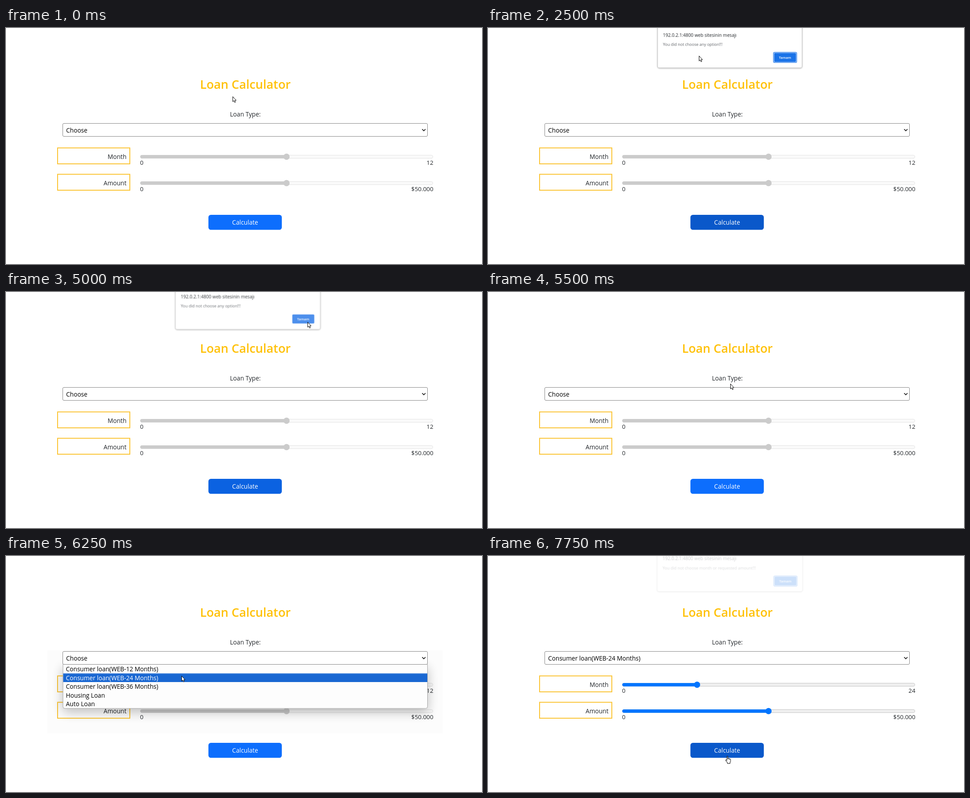
Recreate the animation shown at these times as an HTML page. Size 1061x528 px, loop 8000 ms.

```html
<!DOCTYPE html>
<html lang="en">
<head>
<meta charset="utf-8">
<title>Loan Calculator</title>
<style>
html, body { margin: 0; width: 100%; height: 100%; overflow: hidden; background: #fff; }
svg { display: block; width: 100%; height: 100%; }
text { font: 13.6px "Open Sans", "Noto Sans", sans-serif; fill: #212529; }
.mid { text-anchor: middle; }
.end { text-anchor: end; }
.black text { fill: #000; }
.title { font-size: 26.8px; font-weight: 600; fill: #ffc107; }
.num { font-size: 13.3px; }
.label { fill: none; stroke: #fbc433; stroke-width: 2; }
.track { fill: var(--track); stroke: var(--edge); }
.fill { stroke: var(--fill); stroke-width: 7.4; stroke-linecap: round; }
.thumb { fill: var(--fill); }
.grey { --track: #fafafa; --edge: #e3e3e3; --fill: #cbcbcb; }
.blue { --track: #efefef; --edge: #c6c6c6; --fill: #0075ff; }
.head { font-size: 10px; }
.msg { font-size: 8.9px; fill: #5f6368; }
.ok { font-size: 7.6px; font-weight: 600; fill: #fff; }

/* Every part holds its pose between quarter-second ticks: 3.125% each */
.before, .after, .select, .button, .menu, .hover, .one, .two, .dialog,
.ring, .ok-fill, .first, .second, .cursor, .arrow, .hand {
  animation-duration: 8s;
  animation-timing-function: step-end;
  animation-iteration-count: infinite;
}
.before { animation-name: before; }
.after { animation-name: after; }
@keyframes before { 0% { opacity: 1 } 84.375%, 100% { opacity: 0 } }
@keyframes after { 0% { opacity: 0 } 84.375%, 100% { opacity: 1 } }

.select { fill: #fff; animation-name: focus; }
@keyframes focus {
  0%, 96.875%, 100% { stroke: #858585; stroke-width: 1 }
  84.375% { stroke: #101010; stroke-width: 2 }
}

.button { animation-name: press; }
@keyframes press {
  0%, 65.625%, 100% { fill: #0d6efd }
  18.75%, 93.75% { fill: #0b5ed7 }
  21.875%, 96.875% { fill: #0a58ca }
  62.5% { fill: #0b62e1 }
}

.menu { animation-name: open; }
@keyframes open { 0%, 84.375%, 100% { opacity: 0 } 71.875% { opacity: 1 } }
.list { fill: #fdfdfd; stroke: #a5a5a5; filter: drop-shadow(0 8px 13px rgba(0, 0, 0, .25)); }
.hover { fill: #1967d2; animation-name: hover; }
@keyframes hover {
  0%, 84.375%, 100% { opacity: 0; transform: none }
  75% { opacity: 1; transform: none }
  78.125% { opacity: 1; transform: translateY(19.5px) }
}
.one { animation-name: one; }
.two { animation-name: two; }
@keyframes one { 0%, 78.125%, 100% { fill: #000 } 75% { fill: #fff } }
@keyframes two { 0%, 84.375%, 100% { fill: #000 } 78.125% { fill: #fff } }

.dialog { transform-origin: 539px 0; animation-name: dialog; }
@keyframes dialog {
  0%, 65.625%, 100% { opacity: 0; transform: none }
  21.875%, 96.875% { opacity: .22; transform: translateY(-9.8px) scaleX(1.006) }
  25% { opacity: 1; transform: none }
  62.5% { opacity: .88; transform: translateY(-5.5px) scaleX(1.003) }
}
.panel { fill: #fff; stroke: #c8c8c8; filter: drop-shadow(0 1px 1.5px rgba(0, 0, 0, .3)); }
.ring { fill: #fff; stroke: #1a73e8; stroke-width: 1.3; animation-name: ring; }
@keyframes ring { 0%, 65.625%, 100% { opacity: 1 } 62.5% { opacity: 0 } }
.ok-fill { animation-name: ok; }
@keyframes ok { 0%, 65.625%, 100% { fill: #1a73e8 } 56.25% { fill: #3580ea } }
.first { animation-name: first; }
.second { animation-name: second; }
@keyframes first { 0% { opacity: 1 } 65.625%, 100% { opacity: 0 } }
@keyframes second { 0% { opacity: 0 } 65.625%, 100% { opacity: 1 } }

.cursor { animation-name: move; }
@keyframes move {
  0%, 100% { transform: translate(505px, 153px) }
  3.125% { transform: translate(470px, 129px) }
  6.25% { transform: translate(380px, 150px) }
  9.375% { transform: translate(323px, 222px) }
  12.5% { transform: translate(345px, 318px) }
  15.625% { transform: translate(430px, 392px) }
  18.75% { transform: translate(546px, 443px) }
  25% { transform: translate(548px, 380px) }
  28.125% { transform: translate(505px, 190px) }
  31.25% { transform: translate(470px, 62px) }
  34.375% { transform: translate(397px, 44px) }
  37.5% { transform: translate(430px, 42px) }
  40.625% { transform: translate(480px, 36px) }
  43.75% { transform: translate(517px, 42px) }
  50% { transform: translate(560px, 53px) }
  53.125% { transform: translate(605px, 58px) }
  56.25% { transform: translate(645px, 63px) }
  59.375% { transform: translate(672px, 67px) }
  65.625% { transform: translate(612px, 130px) }
  68.75% { transform: translate(540px, 205px) }
  71.875% { transform: translate(515px, 221px) }
  75% { transform: translate(440px, 246px) }
  78.125% { transform: translate(391px, 268px) }
  87.5% { transform: translate(425px, 335px) }
  90.625% { transform: translate(490px, 402px) }
  93.75% { transform: translate(529.5px, 447px) }
}
.cursor path { fill: #fff; stroke: #000; stroke-linejoin: round; }
.arrow { animation-name: arrow; }
.hand { animation-name: hand; }
@keyframes arrow { 0%, 25% { opacity: 1 } 18.75%, 93.75%, 100% { opacity: 0 } }
@keyframes hand { 0%, 25% { opacity: 0 } 18.75%, 93.75%, 100% { opacity: 1 } }
</style>
</head>
<body>
<svg viewBox="0 0 1061 528">
  <defs>
    <rect id="track" class="track" x="299.5" y="284.5" width="652" height="7" rx="3.5"/>
    <g id="half">
      <use href="#track"/>
      <path class="fill" d="M303 288H625"/>
      <circle class="thumb" cx="625.3" cy="288" r="6.9"/>
    </g>
  </defs>

  <text class="title mid" x="533.5" y="136">Loan Calculator</text>
  <text class="mid" x="533.5" y="198">Loan Type:</text>

  <rect class="label" x="115" y="268.3" width="161" height="35.6"/>
  <rect class="label" x="115" y="327.3" width="161" height="35.6"/>
  <text class="end" x="268.5" y="293">Month</text>
  <text class="end" x="268.5" y="352">Amount</text>

  <g class="grey before">
    <use href="#half"/>
    <use href="#half" y="59"/>
    <text class="num end" x="952.5" y="306.3">12</text>
  </g>
  <g class="blue after">
    <use href="#track"/>
    <path class="fill" d="M303 288H466"/>
    <circle class="thumb" cx="466" cy="288" r="6.9"/>
    <use href="#half" y="59"/>
    <text class="num end" x="952.5" y="306.3">24</text>
  </g>
  <text class="num" x="298.7" y="306.3">0</text>
  <text class="num" x="298.7" y="364.8">0</text>
  <text class="num end" x="952.5" y="364.8">$50.000</text>

  <rect class="button" x="451.2" y="418" width="163.6" height="33.5" rx="5.5"/>
  <text class="mid" x="533" y="440" style="fill:#fff">Calculate</text>

  <g class="menu">
    <path d="M92 211H973V397H92Z" opacity=".012"/>
    <path class="list" d="M127 242.5H939.5V337Q939.5 341 935.5 341H131Q127 341 127 337Z"/>
    <rect class="hover" x="127.5" y="243.5" width="811.5" height="19.5"/>
    <g class="black">
      <text class="one" x="133.5" y="258.3">Consumer loan(WEB-12 Months)</text>
      <text class="two" x="133.5" y="277.8">Consumer loan(WEB-24 Months)</text>
      <text x="133.5" y="297.3">Consumer loan(WEB-36 Months)</text>
      <text x="133.5" y="316.8">Housing Loan</text>
      <text x="133.5" y="336.3">Auto Loan</text>
    </g>
  </g>

  <rect class="select" x="126.5" y="213.5" width="813" height="29" rx="2.5"/>
  <path d="M927.6 226.3l3.7 3.7 3.7-3.7" fill="none" stroke="#111" stroke-width="1.6"/>
  <g class="black">
    <text class="before" x="134" y="234">Choose</text>
    <text class="after" x="134" y="234">Consumer loan(WEB-24 Months)</text>
  </g>

  <g class="dialog">
    <rect class="panel" x="378" y="-20" width="322" height="109" rx="4"/>
    <text class="head" x="390" y="19.5">192.0.2.1:4800 web sitesinin mesajı</text>
    <text class="msg first" x="390" y="39.7">You did not choose any option!!!</text>
    <text class="msg second" x="390" y="39.7">You did not choose month or requested amount!!!</text>
    <rect class="ring" x="636.3" y="54.3" width="51.8" height="23" rx="2.8"/>
    <rect class="ok-fill" x="637.8" y="55.8" width="48.8" height="20" rx="2"/>
    <text class="ok mid" x="662" y="68.6">Tamam</text>
  </g>

  <g class="cursor">
    <path class="arrow" d="M.5 .5V11.8L3 9.6 4.8 13.6 6.6 12.8 4.9 8.9H8.2Z"/>
    <path class="hand" transform="scale(1.06)" d="M2.8 9.5V1.8Q3.8 -.3 4.8 1.8V6.2Q6 5 6.6 6.6 7.8 5.6 8.4 7.1 9.8 6.2 10.4 8V11.5Q10.2 13.5 9.2 14.5V16.2H4V14.6L.8 10.6Q-.3 8.6 1 8.4Z"/>
  </g>
</svg>
</body>
</html>
```
